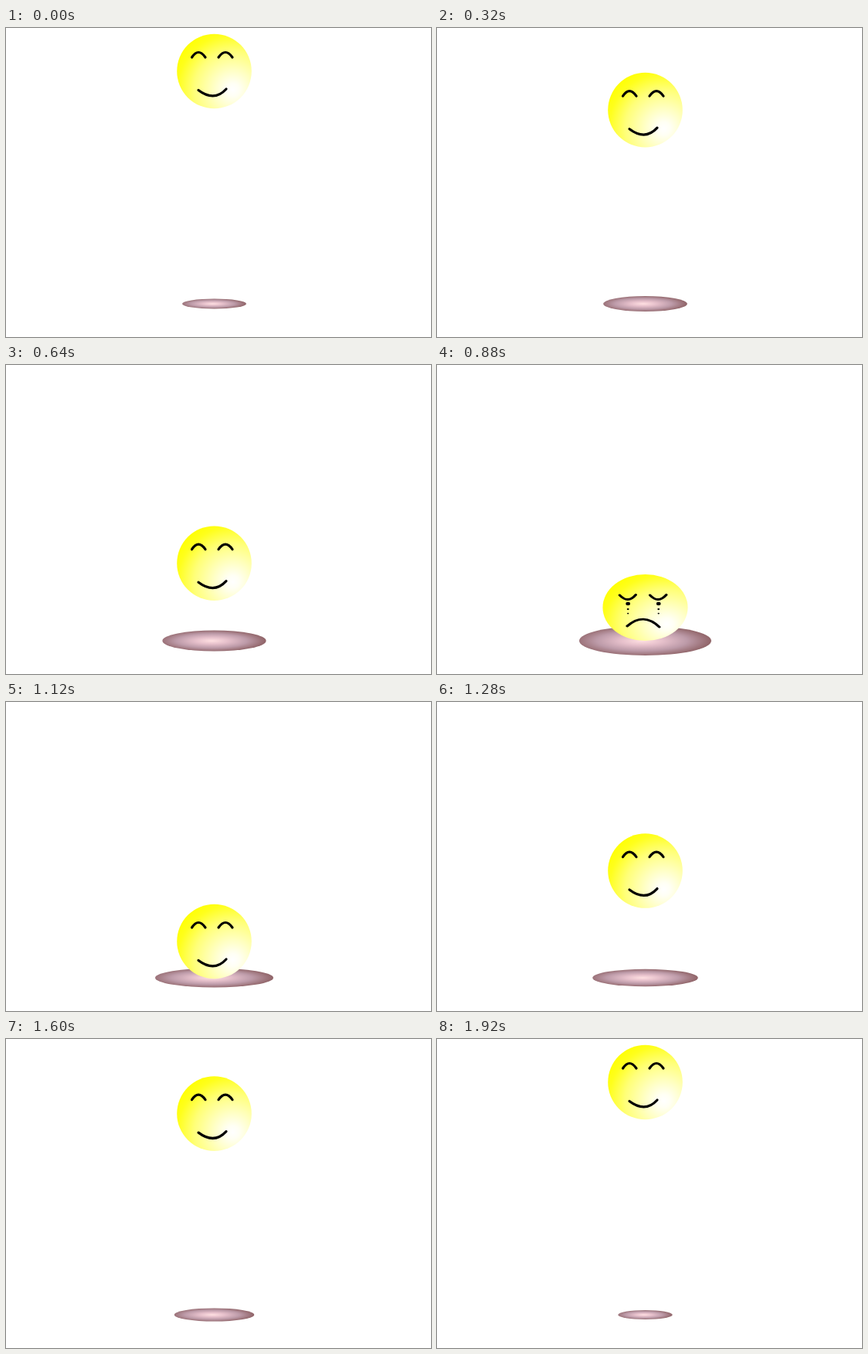
Animation, 550 px wide and 400 px high, one loop 2 s. Source, as an HTML page with a canvas:

```html
<!DOCTYPE html>
<html lang="en">
<head>
<meta charset="utf-8">
<title>Bouncing ball</title>
<style>
  html, body { margin: 0; width: 100%; height: 100%; overflow: hidden; background: #fff; }
  canvas { display: block; }
</style>
</head>
<body>
<canvas id="stage" width="550" height="400"></canvas>
<script>
const ctx = document.getElementById('stage').getContext('2d');
const STEP = 80, STEPS = 25;
const LAND = 9, LEAVE = 14, LAST = 24;
const CX = 269.5, TOP = 56, DROP = 254, RADIUS = 48.3, FLOOR = 357;

const happy = {
  lines: new Path2D(`M-29-18Q-20.5-31-11.5-18M5.5-18Q14.5-31 23.5-18
    M-20.5 24.5Q0 40 15.5 23`),
  tears: []
};
const sad = {
  lines: new Path2D(`M-29-18Q-19.6-5.3-10.8-18.6M5.4-18Q14.7-5.3 23.9-18.6
    M-20.5 27Q-2 6.4 16 28.2`),
  tears: [[-5.6, 2.5], [2.3, 1.3], [8.5, 1]]
};

function radial(x, y, r, stops) {
  const g = ctx.createRadialGradient(x, y, 0, x, y, r);
  for (const [at, color] of stops) g.addColorStop(at, color);
  return g;
}

const skin = radial(24, 24, 84, [
  [0, '#fff'], [0.1, '#fffff4'], [0.3, '#ffffc4'], [0.6, '#ffff78'], [0.85, '#ffff1c'], [1, '#ff0']
]);
const shade = radial(-0.05, 0, 1.05, [
  [0, '#ffe0e2'], [0.3, '#e6c0cb'], [0.65, '#bd9ba9'], [1, '#906468']
]);

const mix = (a, b, p) => a + (b - a) * p;

// Ball height and scale, shadow width and height for one step.
function pose(k) {
  if (k < LAND) {
    return { y: TOP + DROP * (k / LAND) ** 2, sx: 1, sy: 1,
             w: 83 + 6.4 * k, h: 13 + 1.75 * k, face: happy };
  }
  if (k < LEAVE) {
    const p = (k - LAND) / (LEAVE - 1 - LAND);
    return { y: mix(310, 318, p), sx: mix(1, 1.28, p), sy: mix(1, 0.78, p),
             w: mix(135, 207, p), h: mix(30, 46, p), face: sad };
  }
  const left = LAST - k;
  return { y: TOP + DROP * (left / (LAST - LEAVE)) ** 2, sx: 1, sy: 1,
           w: 70.5 + 8.25 * left, h: 12 + 1.3 * left, face: happy };
}

function disc(x, y, r, fill) {
  ctx.fillStyle = fill;
  ctx.beginPath();
  ctx.arc(x, y, r, 0, 2 * Math.PI);
  ctx.fill();
}

function at(x, y, sx, sy, draw) {
  ctx.save();
  ctx.translate(x, y);
  ctx.scale(sx, sy);
  draw();
  ctx.restore();
}

function paint(k) {
  const { y, sx, sy, w, h, face } = pose(k);
  ctx.fillStyle = '#fff';
  ctx.fillRect(0, 0, 550, 400);
  at(CX, FLOOR, w / 2, h / 2, () => disc(0, 0, 1, shade));
  at(CX, y, sx, sy, () => {
    disc(0, 0, RADIUS, skin);
    ctx.strokeStyle = '#000';
    ctx.lineWidth = 3.2;
    ctx.lineCap = ctx.lineJoin = 'round';
    ctx.stroke(face.lines);
    for (const [ty, r] of face.tears) {
      disc(-19.6, ty, r, '#000');
      disc(15.1, ty, r, '#000');
    }
  });
}

const start = performance.now();
function tick() {
  paint(Math.floor((performance.now() - start) / STEP) % STEPS);
  requestAnimationFrame(tick);
}
tick();
</script>
</body>
</html>
```
